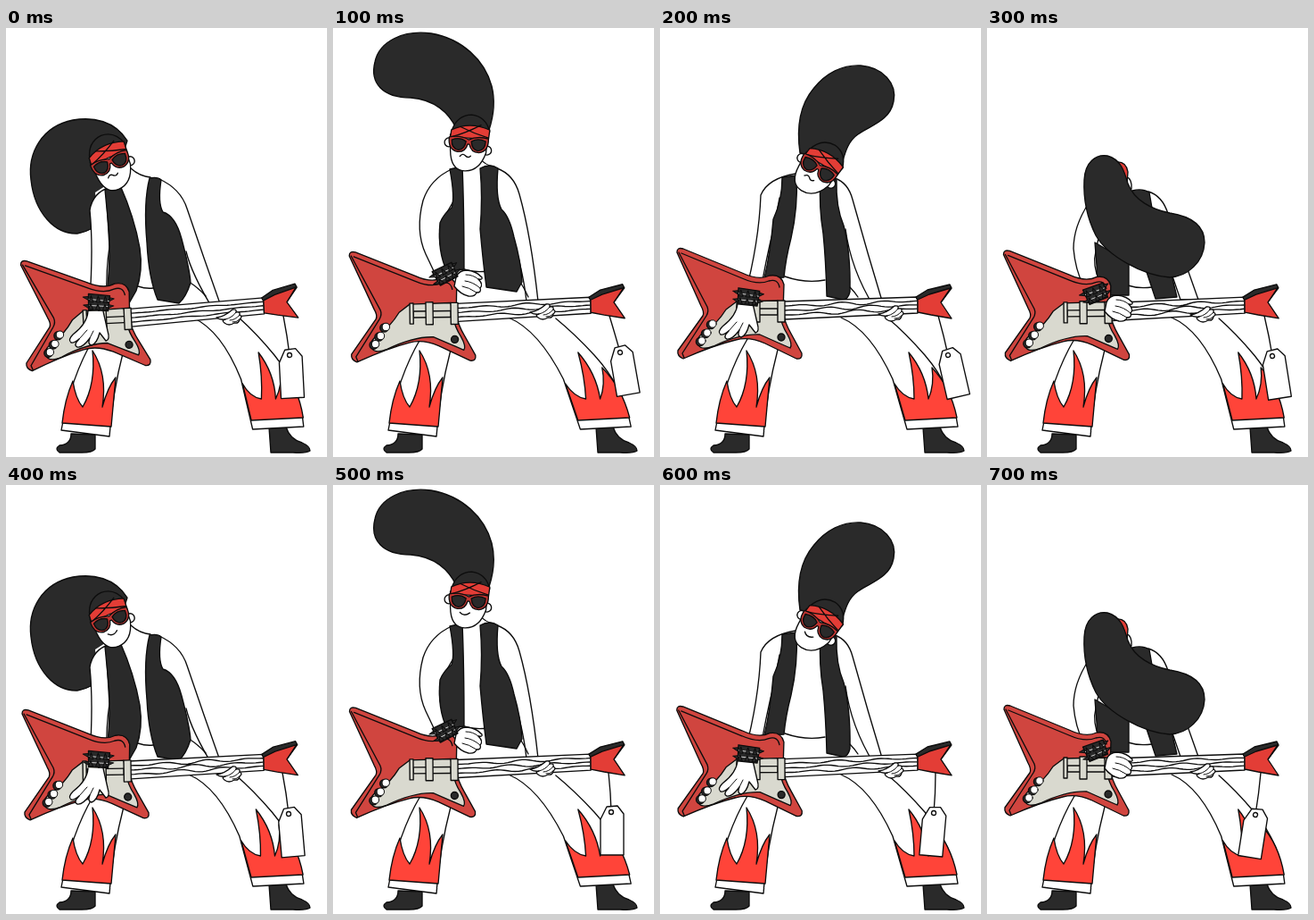
Write an HTML page that moves like this. It is 360 px wide and 480 px high and loops after 800 ms.

```html
<!DOCTYPE html>
<html lang="en">
<head>
<meta charset="utf-8">
<title>Guitar player</title>
<style>
  html, body { margin: 0; width: 100%; height: 100%; overflow: hidden; background: #fff; }
  svg { display: block; width: 360px; height: 480px; }
  path, circle, rect { stroke: #0c0c0c; stroke-width: 1.35; stroke-linejoin: round; stroke-linecap: round; fill: none; }
  .w { fill: #fff; }
  .k { fill: #2a2a2a; }
  .r { fill: #ff4439; }
  .b { fill: #e33d36; }
  .s { fill: #c23531; }
  .g { fill: #d0453f; }
  .p { fill: #d9d9cf; }
  .bare { fill: #fff; stroke: none; }
  .thin { stroke-width: 1; }
  .pale { stroke: #ddd; stroke-width: .9; }
</style>
</head>
<body>
<svg id="stage" viewBox="0 0 360 480"></svg>
<script>
const p = (cls, d) => `<path class="${cls}" d="${d}"/>`;
const dot = (cls, x, y, r) => `<circle class="${cls}" cx="${x}" cy="${y}" r="${r}"/>`;
const box = (cls, x, y, w, h) => `<rect class="${cls}" x="${x}" y="${y}" width="${w}" height="${h}"/>`;
const at = (x, y, rot, s) => `<g transform="translate(${x} ${y}) rotate(${rot})">${s}</g>`;

// Head, centred between the lenses
const head = (x, y, rot, leftEar) => at(x, y, rot,
  p('k', 'M-20,-13 Q-15,-32 2,-33 Q18,-32 23,-15Z') +
  (leftEar ? dot('w', -22, -1, 5) : '') + dot('w', 21, 6, 5) +
  p('w', 'M-21,-10 L-20,8 C-19,24 -12,30 -3,30 C8,30 16,22 20,9 L21,-10Z') +
  p('b', 'M-21,-5 L-20,-15 Q0,-26 23,-17 L22,-5 Q0,-9 -21,-5Z') +
  p('', 'M-20,-7 Q-4,-12 13,-22 M-10,-19 Q6,-12 22,-8') +
  p('s', 'M-22,-7 Q-10,-10 0,-5 Q10,-10 22,-7 Q23,7 12,9 Q3,9 1,0 L-1,0 Q-3,9 -12,9 Q-23,7 -22,-7Z') +
  p('k', 'M-19,-4 Q-10,-8 -3,-3 Q-4,6 -11,7 Q-19,6 -19,-4Z M3,-3 Q10,-8 19,-4 Q19,6 11,7 Q4,6 3,-3Z') +
  p('wavy', 'M-9,14 q3,-4 6,-1 q3,3 6,0') +
  p('smile', 'M-9,13 q5,5 11,0'));

const band = (x, y, rot) => at(x, y, rot,
  p('k', 'M-12,-9 L12,-8 L11,9 L-11,9Z') +
  p('pale', 'M-12,-3 L12,-2 M-11,4 L11,4') +
  [-9, -1, 7].map(i => p('k thin', `M${i - 2},0 l2,-7 l3,7z M${i - 2},8 l2,-6 l3,6z`)).join('') +
  p('k thin', 'M-12,-6 l-6,1 l6,3z M-11,3 l-6,1 l6,3z M12,-6 l5,1 l-5,3z M11,2 l6,1 l-6,3z'));

const spread = (x, y) => at(x, y, 0,
  p('w', 'M92,317 Q91,331 75,343 Q69,349 73,352 Q76,353 82,348 Q75,355 80,357 Q86,358 94,347 Q91,354 96,355 Q102,353 105,341 L112,350 Q117,349 114,339 L109,317') +
  p('thin', 'M82,348 L91,338 M94,347 L98,339'));

const fist = (x, y) => at(x, y, 0,
  p('w', 'M138,279 Q141,271 150,271 Q161,272 167,279 Q168,282 163,281 Q169,287 165,291 Q167,296 161,296 Q159,301 152,300 Q143,298 136,289Z') +
  p('thin', 'M149,276 Q157,276 163,281 M148,283 Q157,284 165,291 M145,289 Q152,290 161,296'));

const fret = (x, y) => at(x, y, 0,
  p('w', 'M-15,1 Q-6,0 3,-8 Q8,-9 7,-5 Q12,-6 11,-2 Q15,0 11,3 Q10,8 5,7 Q-1,11 -6,7 Q-10,4 -5,3 Q-11,4 -15,1Z') +
  p('thin', 'M7,-5 Q3,1 -5,3 M11,-2 Q6,4 0,4 M11,3 Q7,7 3,6'));

const poses = [
  { // leaning, hair hanging left
    back:
      p('k', 'M136,126 C122,104 98,99 75,103 C40,110 24,140 28,170 C32,207 55,231 80,230 C92,228 100,224 106,215 L125,160Z') +
      p('bare', 'M100,184 L122,170 L140,158 L164,167 L200,200 L207,290 L150,300 L112,295Z') +
      p('w', 'M117,178 Q97,184 94,204 Q98,245 94,304 L113,304 Q112,270 116,245 L113,195') +
      p('w', 'M172,169 Q196,180 203,202 Q222,258 242,314 L233,316 Q208,275 202,250') +
      p('', 'M140,157 Q150,166 162,167 M148,289 Q157,292 165,291 M205,284 Q215,290 224,300') +
      p('k', 'M111,181 L128,176 Q144,212 150,246 Q154,272 146,294 L138,308 L112,306 Q119,250 114,212Z') +
      p('k', 'M161,168 Q170,166 174,170 Q170,196 176,206 Q190,210 197,236 Q206,270 207,285 Q202,301 194,308 L170,304 Q160,280 158,240 Q154,195 161,168Z') +
      head(117.5, 151.5, -23, false),
    front: spread(0, 0) + band(104, 307, 3) + fret(251, 323)
  },
  { // upright, hair swept up left
    back:
      p('k', 'M138,112 C130,95 114,80 87,78 C56,78 41,62 47,38 C52,14 80,2 110,6 C145,12 170,36 178,65 C183,85 178,105 175,114Z') +
      p('bare', 'M131,160 L165,148 L185,156 L212,285 L130,290Z') +
      p('w', 'M133,158 Q109,169 101,193 Q92,227 104,253 L114,274 L128,266 Q116,242 121,218 L135,194') +
      p('w', 'M184,157 Q203,164 209,186 Q222,232 230,306 L217,306 Q213,268 195,212') +
      p('', 'M166,147 Q170,153 180,155 M147,270 Q160,274 173,272 M211,286 Q215,292 219,301') +
      p('k', 'M131,158 L145,155 Q147,200 147,270 L128,273 Q117,250 120,218 Q124,208 133,201 Q137,190 131,158Z') +
      p('k', 'M165,157 Q176,151 185,157 Q182,190 189,203 Q198,211 203,234 Q211,262 212,284 L206,295 L172,290 Q168,260 165,225 Q168,190 165,157Z') +
      head(152, 130, 3, true),
    front: fist(0, 0) + band(126, 275, -28) + fret(236, 317)
  },
  { // leaning the other way, hair up right
    back:
      p('k', 'M157,140 C153,112 157,86 172,68 C186,50 205,41 225,42 C250,44 266,62 262,82 C258,104 236,109 222,119 C210,127 207,142 204,152Z') +
      p('bare', 'M136,168 L199,169 L213,290 L140,290Z') +
      p('w', 'M152,163 Q121,168 113,187 Q111,240 95,300 L112,300 Q118,262 128,222 L134,190') +
      p('w', 'M196,168 Q211,173 216,192 Q233,253 251,312 L240,312 Q214,270 208,225') +
      p('', 'M140,278 Q163,286 185,282 M213,290 Q218,295 222,301') +
      p('k', 'M137,167 L153,165 Q155,200 147,235 Q141,258 139,279 L117,280 Q124,250 127,214 Q137,193 137,167Z') +
      p('k', 'M180,171 Q190,166 198,170 Q197,200 206,221 Q214,252 213,295 Q211,304 205,304 L187,300 Q186,260 183,230 Q178,200 180,171Z') +
      head(177, 158, 32, true),
    front: spread(-5, -9) + band(99, 301, 6) + fret(260, 319)
  },
  { // bent forward, hair over the face
    back:
      p('bare', 'M112,200 L183,184 L213,300 L118,300Z') +
      p('w', 'M114,196 Q97,222 97,247 Q99,270 108,288 L126,283 Q118,265 122,250 L126,230') +
      p('w', 'M181,183 Q197,188 203,208 L237,304 L217,304 L206,272') +
      p('', 'M158,288 Q170,292 185,290') +
      p('k', 'M121,240 L159,262 L159,299 L133,299 Q122,284 123,266Z') +
      p('k', 'M163,182 Q174,179 182,184 L190,230 L206,272 L213,301 L189,303 L178,270Z') +
      p('w', 'M156,166 Q163,169 162,180 L152,180Z') +
      p('b', 'M145,150 Q156,149 158,161 L157,174 L150,179Z') +
      p('k', 'M109,170 C110,150 122,141 135,143 C150,147 154,160 158,174 C165,193 185,203 205,207 C230,211 244,222 244,240 C243,262 225,278 205,279 C175,277 135,255 122,232 C112,212 108,190 109,170Z'),
    front: fist(-4, 28) + band(122, 297, -22) + fret(243, 320)
  }
];

const legs =
  p('k', 'M73,454 L100,455 L100,471 Q97,475 85,475 L60,475 Q54,471 60,467 Q73,466 73,454Z') +
  p('k', 'M295,447 L314,446 Q318,460 332,464 Q341,468 341,473 Q337,476 322,475 L297,475Z') +
  p('w', 'M98,348 Q73,390 62,450 L116,457 Q119,410 132,360') +
  p('r', 'M63,442 Q66,415 75,395 Q78,415 86,424 Q101,398 97,361 Q114,387 108,424 Q114,402 123,391 L118,446Z') +
  '<g id="leg">' +
  p('w', 'M203,324 Q236,338 261,393 L277,449 L334,446 Q328,402 297,366 Q276,342 256,325') +
  p('r', 'M275,439 L263,398 Q272,413 285,415 Q285,390 279,363 Q298,386 301,415 Q308,399 305,380 Q326,402 333,436Z') +
  '</g>';

const guitar =
  p('g', 'M19,251 Q19,245 26,247 L92,274 Q111,283 123,277 Q136,275 139,287 L138,318 Q140,330 147,342 L159,364 Q160,371 153,370 L118,353 Q100,345 85,349 Q60,355 26,370 Q19,367 20,361 L48,322 Q50,318 46,311Z') +
  p('', 'M21,251 L53,312 Q55,317 52,322 L25,364 L27,369 M24,252 L92,280 Q110,288 122,283 Q132,280 134,290') +
  p('p', 'M86,306 L74,315 Q64,331 50,340 Q39,347 43,355 Q47,361 60,356 Q90,342 112,343 Q132,352 146,358 Q149,354 143,343 Q136,332 135,322 L132,305Z') +
  [[58, 331], [52, 341], [46, 350]].map(([x, y]) => dot('k', x - 1, y + 1, 4.6) + dot('w thin', x + 1, y, 4.2)).join('') +
  dot('k', 136, 346, 4) +
  box('p', 90, 314, 42, 7) +
  p('w', 'M138,306 L289,301 L289,319 L140,326Z') +
  '<path id="strings"/>' +
  box('p', 86, 305, 4, 23) + box('p', 104, 304, 8, 25) + box('p', 132, 305, 8, 24) +
  p('k', 'M287,301 L300,293 L325,287 L327,291 L315,307 L300,304 L289,305Z') +
  p('b', 'M289,304 L302,298 L326,291 L315,307 L327,325 L304,321 L289,318Z');

const tag = p('w', 'M-12,8 L-5,-6 L7,-7 L14,2 L14,48 L-12,48Z') + dot('w', 0, 0, 2.5);

const svg = document.getElementById('stage');
const layer = part => poses.map(q => `<g class="${part}">${q[part]}</g>`).join('');
svg.innerHTML = legs + layer('back') +
  `<path id="cord"/><g id="tag">${tag}</g><g id="guitar">${guitar}</g>` + layer('front');

const $ = s => svg.querySelector(s);
const all = s => [...svg.querySelectorAll(s)];
const backs = all('.back'), fronts = all('.front');
const wavy = all('.wavy'), smiles = all('.smile');
const show = (el, on) => { el.style.display = on ? '' : 'none'; };

// guitar angle, knee lean, cord x, tag x, tag y, tag angle, string swing
const steps = [
  [-2.8, 3, 311, 318, 366, -3, .7],
  [-.8, -3, 310, 322, 363, -10, 1.6],
  [0, 0, 312, 323, 366, -13, 2],
  [-.5, 2, 311, 320, 367, -9, 2],
  [-1, 1, 310, 317, 368, -5, 2],
  [-.5, -3, 309, 312, 366, 0, 1.7],
  [-.2, 0, 309, 307, 367, 5, 1.5],
  [0, 2, 307, 301, 369, 9, 1.5]
];

function strings(step, swing) {
  let d = '';
  [.25, .5, .75].forEach((f, n) => {
    for (let x = 140; x <= 288; x += 4) {
      const u = (x - 140) / 148;
      const y = 306 - 5 * u + f * (20 - 2.5 * u)
        + swing * Math.sin(Math.PI * u) * Math.sin(x * .13 + step * 1.7 + n * 2);
      d += (x === 140 ? 'M' : 'L') + x + ',' + y.toFixed(1);
    }
  });
  return d;
}

function draw(i) {
  const [angle, knee, cx, tx, ty, turn, swing] = steps[i];
  const set = (s, name, v) => $(s).setAttribute(name, v);
  [backs, fronts].forEach(list => list.forEach((el, n) => show(el, n === i % 4)));
  wavy.forEach(el => show(el, i < 4));
  smiles.forEach(el => show(el, i >= 4));
  set('#guitar', 'transform', `rotate(${angle} 308 308)`);
  set('#leg', 'transform', `translate(0 442) skewX(${-knee}) translate(0 -442)`);
  set('#cord', 'd', `M${cx},322 Q${(cx + tx) / 2 + 1},345 ${tx},${ty}`);
  set('#tag', 'transform', `translate(${tx} ${ty}) rotate(${turn})`);
  set('#strings', 'd', strings(i, swing));
}

let start = null, last = 0;
function tick(now) {
  if (start === null) start = now;
  const i = Math.floor(Math.max(0, now - start) / 100) % steps.length;
  if (i !== last) draw(last = i);
  requestAnimationFrame(tick);
}
draw(0);
requestAnimationFrame(tick);
</script>
</body>
</html>
```
